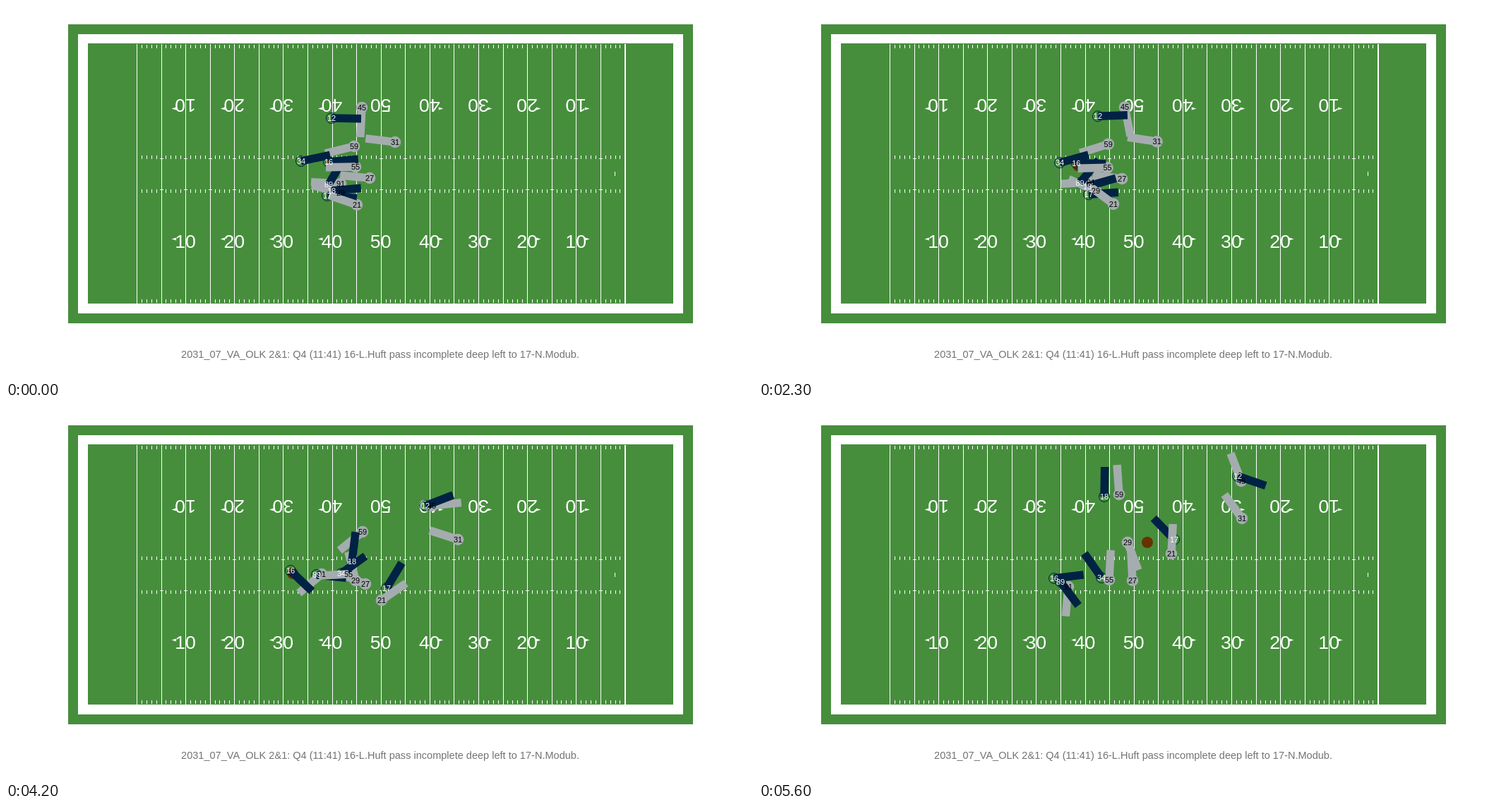
Write an HTML page that moves like this. It is 1058 px wide and 529 px high and loops after 6.1 s.

```html
<!DOCTYPE html>
<html lang="en">
<head>
<meta charset="utf-8">
<title>Play tracking</title>
<style>
  html, body { margin: 0; width: 100%; height: 100%; overflow: hidden; background: #fff; }
  svg { display: block; width: 1058px; height: 529px; font-family: "Liberation Sans", Arial, sans-serif; }
  text { text-anchor: middle; }
  .crisp { shape-rendering: crispEdges; }
  .marks { fill: #fff; }
  .numbers { fill: #fff; font-size: 26.7px; }
  .label { font-size: 11px; }
  .caption { fill: #737373; font-size: 14.55px; }
</style>
</head>
<body>
<svg viewBox="0 0 1058 529">
  <g id="turf" class="crisp"></g>
  <g id="marks" class="crisp marks"></g>
  <g id="numbers" class="numbers"></g>
  <circle id="ball" r="8" fill="#663300"/>
  <g id="dots"></g>
  <g id="bars"></g>
  <g id="labels"></g>
  <text class="caption" x="530" y="499">2031_07_VA_OLK 2&amp;1: Q4 (11:41) 16-L.Huft pass incomplete deep left to 17-N.Modub.</text>
</svg>
<script>
const byId = id => document.getElementById(id);

function add(parent, tag, attrs, text) {
  const node = document.createElementNS("http://www.w3.org/2000/svg", tag);
  for (const key in attrs) node.setAttribute(key, attrs[key]);
  if (text !== undefined) node.textContent = text;
  byId(parent).appendChild(node);
  return node;
}

// Field, measured in yards around its centre line
const YARD = 6.914, MIDDLE = 237.75, WIDTH = 53.3;
const GREEN = "#468e3c", NAVY = "#002244", SILVER = "#a5acaf";
const yardX = yard => 184.95 + yard * YARD;

function turf(margin, fill) {
  const height = (WIDTH + 2 * margin) * YARD;
  add("turf", "rect", {
    x: yardX(-10 - margin), y: MIDDLE - height / 2,
    width: (120 + 2 * margin) * YARD, height, fill
  });
}
turf(4, GREEN);
turf(2, "#fff");
turf(0, GREEN);

const mark = (x, y, width, height) => add("marks", "rect", { x, y, width, height });

for (let yard = 0; yard <= 100; yard++) {
  const x = Math.round(yardX(yard));
  if (yard % 5) {
    for (const y of [55, 212, 260, 416]) mark(x, y, 1, 5);
  } else {
    mark(x, 54, yard === 100 ? 2 : 1, 368);
    if (yard % 100) for (const y of [216, 260]) mark(x - 2, y, 5, 1);
  }
}
mark(862, 235, 1, 6);

for (let yard = 10; yard <= 90; yard += 10) {
  const x = yardX(yard), value = Math.min(yard, 100 - yard);
  add("numbers", "text", { x, y: 343 }, value);
  add("numbers", "text", { transform: `translate(${x} 132) rotate(180)` }, value);
  if (yard === 50) continue;
  const side = Math.sign(yard - 50);
  for (const y of [330.5, 145.5])
    add("numbers", "path", { d: `M${x + side * 19.5} ${y}l${side * -6.5} -2v4z` });
}

// Players speed up from the line to their break, then run evenly to the end
const BREAK = 36, RELEASE = 43, END = 50;
const mix = (a, b, u) => a.map((v, i) => v + (b[i] - v) * u);

function poseAt(step, [line, turn, finish]) {
  return step < BREAK
    ? mix(line, turn, (step / BREAK) ** 2.6)
    : mix(turn, finish, (step - BREAK) / (END - BREAK));
}

const players = [];

function player(number, color, path) {
  const ours = color === NAVY;
  players.push({
    path,
    dot: add("dots", "circle", ours ? { r: 7.5, fill: "none", stroke: NAVY } : { r: 8.3, fill: SILVER }),
    bar: add("bars", "rect", { y: -5.75, width: 42, height: 11.5, fill: color }),
    label: add("labels", "text", { class: "label", y: 4, fill: ours ? "#fff" : "#000" }, number)
  });
}

const offense = (number, ...path) => player(number, NAVY, path);
const defense = (number, ...path) => player(number, SILVER, path);

// Each pose: x, y, facing in degrees
defense(91, [474, 252, 183], [447, 237, 140], [438, 255, 95]);
defense(29, [474, 265, 195], [495, 246, 256], [522, 192, 69]);
defense(27, [515, 244, 185], [509, 251, 202], [529, 246, 267]);
defense(45, [504, 144, 93], [603, 140, -6], [683, 105, -111]);
defense(31, [551, 193, 187], [640, 188, 198], [684, 158, 234]);
defense(59, [493, 199, 166], [505, 177, 141], [510, 124, 266]);
const passer = [[457, 221, -5], [403, 232, 44], [418, 243, -7]];
offense(16, ...passer);
offense(12, [461, 159, 1], [594, 140, -21], [678, 98, 19]);
offense(34, [418, 220, -12], [475, 236, -36], [485, 242, -125]);
offense(89, [457, 253, -60], [440, 238, 6], [427, 248, 53]);
offense(18, [461, 262, -5], [490, 219, -83], [489, 127, -89]);
offense(17, [455, 269, 5], [539, 257, -59], [588, 188, -134]);
defense(55, [495, 228, 179], [485, 237, 177], [496, 245, 273]);
defense(21, [497, 282, 199], [532, 274, 325], [584, 208, 273]);

// The ball stays in the passer's hands until the throw
function ballAt(step) {
  const [x, y] = poseAt(Math.min(step, RELEASE), passer);
  const flight = Math.max(0, (step - RELEASE) / (END - RELEASE));
  return mix([x + 3, y + 4], [550, 192], flight);
}

const moveTo = (node, [x, y, angle = 0]) =>
  node.setAttribute("transform", `translate(${x} ${y}) rotate(${angle})`);

function show(step) {
  for (const { path, dot, bar, label } of players) {
    const pose = poseAt(step, path), spot = pose.slice(0, 2);
    moveTo(dot, spot);
    moveTo(bar, pose);
    moveTo(label, spot);
  }
  moveTo(byId("ball"), ballAt(step));
}

const LOOP = 6100, STEP = 100, HOLD = 600;
const start = performance.now();
let shown = -1;

function tick() {
  const time = Math.max(0, performance.now() - start) % LOOP;
  const step = Math.min(END, Math.max(0, Math.floor((time - HOLD) / STEP)));
  if (step !== shown) show(shown = step);
  requestAnimationFrame(tick);
}
tick();
</script>
</body>
</html>
```
